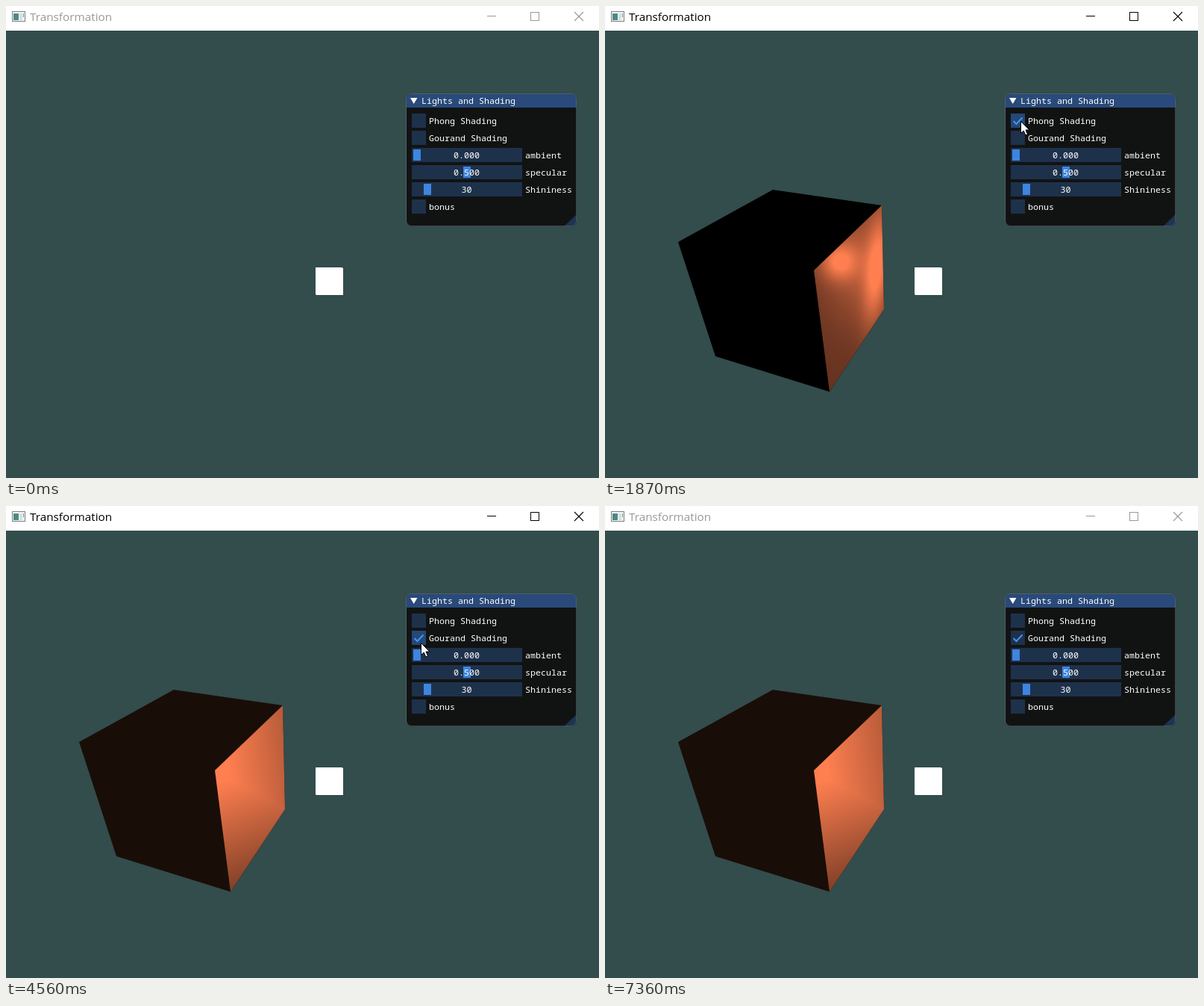
These frames come from a looping animation (795 by 632 pixels, 7.61 s). An HTML page with a canvas:

```html
<!DOCTYPE html>
<html lang="en">
<head>
<meta charset="utf-8">
<title>Transformation</title>
<style>
html, body { margin: 0; height: 100%; overflow: hidden; background: #334c4c; }
canvas { display: block; }
</style>
</head>
<body>
<canvas id="stage" width="795" height="632"></canvas>
<script>
const LOOP = 7610, STEP = 76.5;
const ctx = document.getElementById('stage').getContext('2d');
const MONO = '11.67px "Noto Sans Mono", "DejaVu Sans Mono", monospace';
const FRAME = '#1e314b', HOVER = '#254875', ACTIVE = '#316aac', GRAB = '#3d85e0';

const outline = [[98, 316], [225, 246], [371, 267], [374, 406], [301, 516.5], [148, 469]];
// Lit side: x, y, brightness at each corner
const side = [[280, 354, 1.06], [371, 267, .72], [374, 406, .77], [301, 516.5, .5]];

// Pointer legs: start time, steps, end x, end y, ease-out power
const legs = [
  [320, 9, 569, 187, 1.6],
  [1014, 6, 557, 154, 2],
  [3735, 5, 556, 183, 1.6],
  [5193, 5, 697, 517, .85],
  [5570, 5, 755, 627, 1.3]
];

function rect(x, y, w, h, color) {
  ctx.fillStyle = color;
  ctx.fillRect(x, y, w, h);
}

function trace(points) {
  ctx.beginPath();
  for (const [x, y] of points) ctx.lineTo(x, y);
}

function poly(points, color) {
  trace(points);
  ctx.closePath();
  ctx.fillStyle = color;
  ctx.fill();
}

function line(points, color, width) {
  trace(points);
  ctx.strokeStyle = color;
  ctx.lineWidth = width;
  ctx.stroke();
}

function text(str, x, y, font = MONO, color = '#fff') {
  ctx.font = font;
  ctx.fillStyle = color;
  ctx.fillText(str, x, y);
}

// Interpolates corner brightness across a triangle
function blend(x, y, [a, b, c]) {
  const d = (b[1] - c[1]) * (a[0] - c[0]) + (c[0] - b[0]) * (a[1] - c[1]);
  const u = ((b[1] - c[1]) * (x - c[0]) + (c[0] - b[0]) * (y - c[1])) / d;
  const v = ((c[1] - a[1]) * (x - c[0]) + (a[0] - c[0]) * (y - c[1])) / d;
  return u * a[2] + v * b[2] + (1 - u - v) * c[2];
}

function gouraud(x, y) {
  const [a, b, c, d] = side;
  const below = (y - a[1]) * (c[0] - a[0]) > (x - a[0]) * (c[1] - a[1]);
  return blend(x, y, below ? [a, c, d] : [a, b, c]);
}

const spot = (dx, dy, rx, ry) => Math.exp(-((dx / rx) ** 2) - (dy / ry) ** 2);

function phong(x, y) {
  return .4 + .3 * spot(x - 350, y - 345, 60, 85)
    + .45 * spot(x - 313, y - 342, 25, 25)
    + .4 * spot(x - 364 + (y - 350) * .1, y - 350, 15, 75);
}

function bake(shade) {
  const tex = document.createElement('canvas');
  tex.width = 96;
  tex.height = 252;
  const g = tex.getContext('2d'), img = g.createImageData(96, 252);
  for (let y = 0, i = 0; y < 252; y++) {
    for (let x = 0; x < 96; x++, i += 4) {
      const k = Math.min(1, shade(x + 279.5, y + 266.5));
      img.data.set([255 * k, 127 * k, 80 * k, 255], i);
    }
  }
  g.putImageData(img, 0, 0);
  return tex;
}

const phongTex = bake(phong), gouraudTex = bake(gouraud);

function drawCube(tex, dark) {
  poly(outline, dark);
  ctx.save();
  trace(side);
  ctx.clip();
  ctx.drawImage(tex, 279, 266);
  ctx.restore();
}

function drawTitleBar(focused) {
  const ink = focused ? '#000' : '#999';
  rect(0, 0, 795, 33, '#fff');
  rect(8, 7, 18, 14, '#7b8084');
  rect(9, 8, 16, 12, '#f4f6f6');
  rect(10, 10, 7, 9, '#4b8a84');
  rect(18, 10, 4, 9, '#d8dfdf');
  rect(23, 10, 1, 5, '#5f9f80');
  text('Transformation', 32, 20, '15.3px "Open Sans", "Noto Sans", sans-serif', ink);
  rect(645, 13, 12, 1, ink);
  ctx.strokeStyle = ink;
  ctx.lineWidth = 1;
  ctx.strokeRect(703.5, 8.5, 11, 11);
  line([[762, 8], [774, 20]], ink, 1.1);
  line([[774, 8], [762, 20]], ink, 1.1);
}

function checkbox(y, label, color, checked) {
  rect(544, y, 19, 19, color);
  if (checked) line([[547.5, y + 10], [551.5, y + 14], [559.5, y + 5.5]], '#4093f3', 2);
  text(label, 567, y + 14);
}

function slider(y, label, value, grabX) {
  rect(544, y, 148, 19, FRAME);
  rect(grabX, y + 2, 10, 15, GRAB);
  text(value, 617.5 - value.length * 3.5, y + 14);
  text(label, 696, y + 14);
}

function drawPanel(phongBox, phongOn, gouraudBox, gouraudOn) {
  ctx.save();
  ctx.beginPath();
  ctx.roundRect(537, 118, 228, 177, 7);
  ctx.clip();
  rect(537, 118, 228, 177, '#111313');
  rect(537, 118, 228, 18, '#294a7a');
  poly([[765, 279], [765, 295], [748, 295]], '#1e3450');
  ctx.restore();
  ctx.beginPath();
  ctx.roundRect(536.5, 117.5, 228, 177, 7);
  ctx.strokeStyle = 'rgba(110,110,128,.5)';
  ctx.lineWidth = 1;
  ctx.stroke();

  poly([[542, 123], [551.5, 123], [546.7, 131]], '#fff');
  text('Lights and Shading', 557, 131);
  checkbox(144, 'Phong Shading', phongBox, phongOn);
  checkbox(167, 'Gourand Shading', gouraudBox, gouraudOn);
  slider(190, 'ambient', '0.000', 546);
  slider(213, 'specular', '0.500', 613);
  slider(236, 'Shininess', '30', 560);
  checkbox(259, 'bonus', FRAME, false);
}

function pointerAt(t) {
  let x = 687, y = 552;
  for (const [start, steps, toX, toY, power] of legs) {
    const k = Math.min(steps, Math.floor((t - start + 8) / STEP));
    if (k <= 0) break;
    const p = 1 - (1 - k / steps) ** power;
    x += (toX - x) * p;
    y += (toY - y) * p;
  }
  return [Math.round(x), Math.round(y)];
}

function drawPointer(x, y) {
  ctx.save();
  ctx.translate(x + .5, y + .5);
  poly([[0, 0], [0, 16], [3.7, 12.5], [6.3, 18.5], [9, 17.3], [6.5, 11.5], [11.3, 11.5]], '#fff');
  ctx.strokeStyle = '#000';
  ctx.lineWidth = 1;
  ctx.stroke();
  ctx.restore();
}

function draw(t) {
  const during = (from, to) => t >= from && t < to;
  const focused = during(1620, 7360);
  const pressed = during(1620, 1870) || during(3330, 3560) || during(4330, 4560);
  const visible = during(320, 6050);
  const [px, py] = pointerAt(t);
  const boxColor = top => focused && visible && px < 660 && py >= top && py < top + 19
    ? (pressed ? ACTIVE : HOVER) : FRAME;

  rect(0, 0, 795, 632, '#334c4c');
  drawTitleBar(focused);
  if (t >= 4560) drawCube(gouraudTex, '#190d08');
  else if (t >= 1870) drawCube(phongTex, '#000');
  poly([[415, 350], [450, 350], [452, 351], [452, 387], [416, 387], [415, 386]], '#fff');
  drawPanel(boxColor(144), during(1870, 3560), boxColor(167), t >= 4560);

  if (visible) drawPointer(px, py);
  if (pressed) {
    ctx.beginPath();
    ctx.arc(px, py + 1, 15, 0, 7);
    ctx.fillStyle = 'rgba(255,255,0,.5)';
    ctx.fill();
  }
}

function tick(now) {
  draw(now % LOOP);
  requestAnimationFrame(tick);
}
draw(0);
requestAnimationFrame(tick);
</script>
</body>
</html>
```
